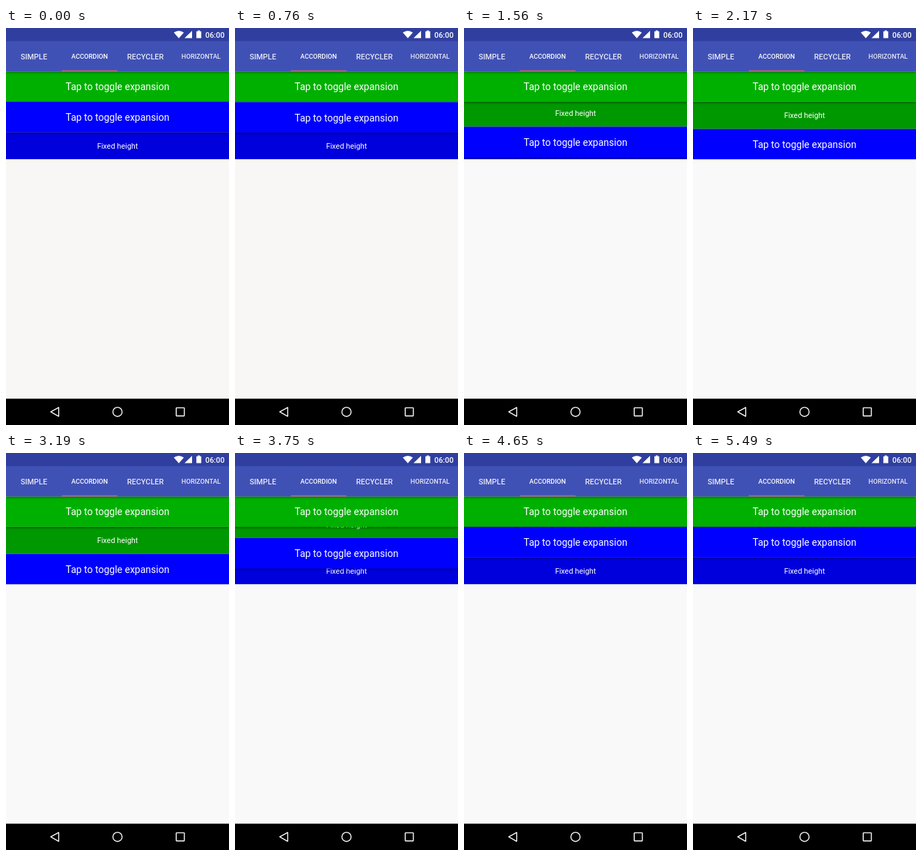
An HTML page for the animation above (5590 ms loop, 320 by 569 pixels).

```html
<!DOCTYPE html>
<html lang="en">
<head>
<meta charset="utf-8">
<title>Accordion</title>
<style>
  html, body { margin: 0; width: 100%; height: 100%; overflow: hidden; background: #f9f9f9; }
  svg { display: block; width: 100%; height: 100%; }
  text { font-family: Roboto, sans-serif; fill: #fff; text-anchor: middle; }
  .title { font-size: 14px; }
  .body { font-size: 10.9px; }
  .tab { font-size: 10.9px; font-weight: 500; }
  .tab.long { font-size: 9.33px; }
  .idle { fill-opacity: .87; }
</style>
</head>
<body>
<svg viewBox="0 0 320 569">
  <defs>
    <filter id="shadow" x="-5%" y="-30%" width="110%" height="160%">
      <feDropShadow dx="0" dy="1.6" stdDeviation="1.5" flood-color="#000" flood-opacity=".42"/>
    </filter>
    <clipPath id="list"><rect y="62.2" width="320" height="126"/></clipPath>
  </defs>

  <rect id="page" width="320" height="569" fill="#f9f9f9"/>

  <g clip-path="url(#list)">
    <g id="greenBody">
      <rect width="320" height="38.9" fill="#009800"/>
      <text class="body" x="160" y="23.7">Fixed height</text>
    </g>
    <g transform="translate(0 149.3)">
      <rect width="320" height="38.9" fill="#0000dc"/>
      <text class="body" x="160" y="23.7">Fixed height</text>
    </g>
    <g transform="translate(0 62.2)">
      <rect width="320" height="43.6" fill="#00b000" filter="url(#shadow)"/>
      <text class="title" x="160" y="27.3">Tap to toggle expansion</text>
    </g>
    <g id="blueHeader">
      <rect width="320" height="43.6" fill="#00f" filter="url(#shadow)"/>
      <text class="title" x="160" y="27.3">Tap to toggle expansion</text>
    </g>
  </g>

  <!-- App bar -->
  <rect width="320" height="62.2" fill="#3f51b5" filter="url(#shadow)"/>
  <rect width="320" height="18.7" fill="#303f9f"/>
  <rect x="80" y="60.6" width="80" height="1.6" fill="#b9607c"/>
  <text class="tab idle" x="40" y="44.8">SIMPLE</text>
  <text class="tab long" x="120" y="44.2">ACCORDION</text>
  <text class="tab idle" x="200" y="44.8">RECYCLER</text>
  <text class="tab long idle" x="280" y="44.2">HORIZONTAL</text>

  <!-- Status icons -->
  <g fill="#fff">
    <path d="M240.8 6.6Q248 1.4 255.2 6.6L248 14.8Z"/>
    <path d="M256.2 14.6L267 4V14.6Z"/>
    <path d="M273.2 4.8H275.2V3.6H278.2V4.8H280.2V14.6H273.2Z"/>
  </g>
  <text class="tab" x="299.8" y="13.7">06:00</text>

  <!-- Navigation bar -->
  <rect y="531.3" width="320" height="37.7"/>
  <g fill="none" stroke="#fff" stroke-width="1.4" stroke-linejoin="round">
    <path d="M64.2 550.2L75.6 543.8V556.6Z"/>
    <circle cx="160" cy="550.2" r="6.6"/>
    <rect x="244.3" y="544.4" width="11.6" height="11.6" rx=".4"/>
  </g>
</svg>
<script>
  const LOOP = 5590, DURATION = 1370;
  const OPEN_AT = 660, CLOSE_AT = 3220;
  const HEADER_TOP = 105.8, BODY_HEIGHT = 38.9;
  const [page, greenBody, blueHeader] =
    ['page', 'greenBody', 'blueHeader'].map(id => document.getElementById(id));

  const progress = (t, start, length) => Math.min(1, Math.max(0, (t - start) / length));

  // cubic-bezier(.4, 0, .2, 1), solved by bisection
  function fastOutSlowIn(x) {
    let low = 0, high = 1;
    for (let i = 0; i < 20; i++) {
      const s = (low + high) / 2, r = 1 - s;
      if (1.2 * r * r * s + .6 * r * s * s + s ** 3 < x) low = s; else high = s;
    }
    return low * low * (3 - 2 * low);
  }

  const moveTo = (element, y) => element.setAttribute('transform', `translate(0 ${y})`);

  function draw(now) {
    const t = now % LOOP;
    const open = fastOutSlowIn(progress(t, OPEN_AT, DURATION))
               - fastOutSlowIn(progress(t, CLOSE_AT, DURATION));
    const top = HEADER_TOP + BODY_HEIGHT * open;
    moveTo(blueHeader, top);
    moveTo(greenBody, top - BODY_HEIGHT);

    const warm = 1 - progress(t, 570, 930);
    page.setAttribute('fill', `rgb(${249 - warm}, ${249 - 2 * warm}, ${249 - 4 * warm})`);
  }

  const start = performance.now();
  function tick() {
    draw(performance.now() - start);
    requestAnimationFrame(tick);
  }
  tick();
</script>
</body>
</html>
```
